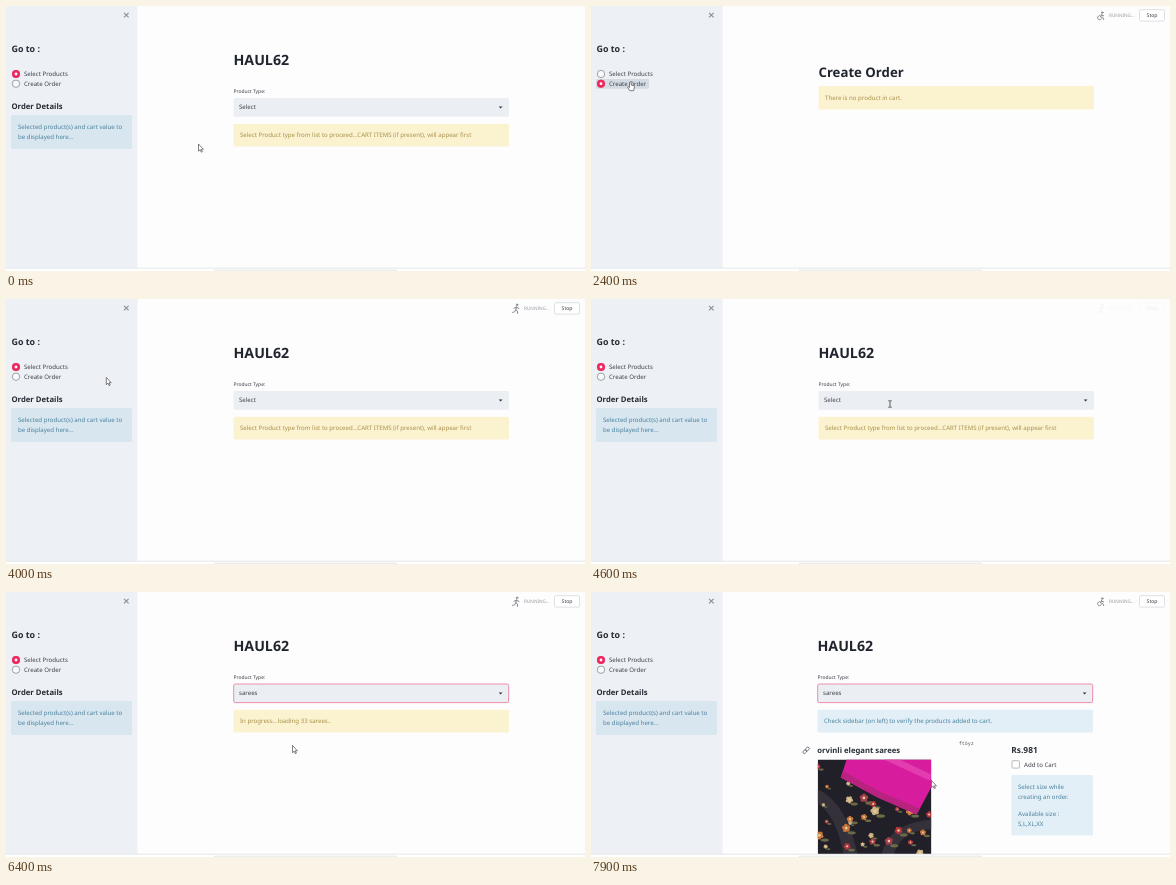
These frames come from a looping animation (579 by 265 pixels, 8 s). An HTML page:

```html
<!DOCTYPE html>
<html lang="en">
<head>
<meta charset="utf-8">
<title>Shop order page</title>
<style>
  html, body { margin: 0; width: 100%; height: 100%; overflow: hidden; background: #fdfdfe; }
  svg { display: block; width: 579px; height: 265px; }
  text { font: 6.1px "Noto Sans", "Open Sans", sans-serif; fill: #3c3f48; text-rendering: geometricPrecision; white-space: pre; }
  .h1 { font-size: 14.2px; font-weight: 700; fill: #20242e; }
  .order { font-size: 13.2px; }
  .h2 { font-size: 8.9px; font-weight: 700; fill: #262a34; }
  .details { font-size: 7.7px; }
  .h3 { font-size: 7.7px; font-weight: 600; fill: #2c303a; }
  .price { font-size: 8.4px; }
  .label { font-size: 4.95px; }
  .mono { font: 5px "Noto Sans Mono", "DejaVu Sans Mono", monospace; fill: #555; }
  .small { font-size: 4.7px; fill: #989ba1; }
  .stop { font-size: 5.1px; }
  .warn rect { fill: #fbf2d0; }
  .warn text { fill: #a8904a; }
  .info rect { fill: #e2eff7; }
  .info text { fill: #4a819c; }
  .side rect { fill: #d8e6f0; }
  .ring { fill: #f8f9fb; stroke: #7a7d84; stroke-width: .7; }
  .dot { fill: #f2265f; }
  .pip { fill: #fff; }
  .line { fill: none; stroke: #84878d; stroke-width: 1; stroke-linecap: round; stroke-linejoin: round; }
  .pointer { fill: #fff; stroke: #4a4a4e; stroke-width: .7; stroke-linejoin: round; }
</style>
</head>
<body>
<svg viewBox="0 0 579 265">
  <rect width="579" height="265" fill="#fdfdfe"/>
  <rect width="131.5" height="262" fill="#edf1f5"/>

  <!-- sidebar -->
  <path d="M118 6.8l4.6 4.6M122.6 6.8l-4.6 4.6" stroke="#8d9199" stroke-width="1.2"/>
  <text class="h2" x="5.5" y="45.6">Go to :</text>
  <rect data-on="2000-3700" x="5" y="73" width="53" height="9.8" rx="1" fill="#d3dce3"/>
  <circle class="ring" cx="10" cy="68" r="3.7"/>
  <circle class="ring" cx="10" cy="77.7" r="3.7"/>
  <g id="choice">
    <circle class="dot" cx="10" cy="68" r="4"/>
    <circle class="pip" cx="10" cy="68" r="1.4"/>
  </g>
  <text x="18" y="70.4">Select Products</text>
  <text x="18" y="80.1">Create Order</text>
  <g data-on="0-2300 4000-8000">
    <text class="h2 details" x="5.5" y="102.7">Order Details</text>
    <g class="info side" id="summary">
      <rect x="5" y="109" width="121" height="34" rx="1.5"/>
      <text x="12" y="123.3">Selected product(s) and cart value to</text>
      <text x="12" y="133.4">be displayed here...</text>
    </g>
  </g>

  <!-- product page -->
  <g id="shop" data-on="0-2300 4000-8000">
    <text class="h1" x="227.5" y="59.2">HAUL62</text>
    <text class="label" x="227.5" y="86.9">Product Type:</text>
    <rect x="227.5" y="92" width="275.5" height="18.8" rx="1.5" fill="#ebeff3"/>
    <rect data-on="4700-8000" x="227.7" y="92" width="275" height="18.6" rx="1.5" fill="none" stroke="#f0648f" stroke-width=".7"/>
    <path d="M492.7 100.6h3.8l-1.9 2z" fill="#33363e"/>
    <text data-on="0-5300" x="233" y="103.4">Select</text>
    <text data-on="5300-8000" x="233" y="103.4">sarees</text>

    <g class="warn" data-on="0-5400">
      <rect x="227.5" y="117.8" width="275.5" height="22.6" rx="1.5"/>
      <text x="234" y="131.4">Select Product type from list to proceed...CART ITEMS (if present), will appear first</text>
    </g>
    <g class="warn" id="progress" data-on="5400-6500">
      <rect x="227.5" y="117.8" width="275.5" height="22.6" rx="1.5"/>
      <text x="234" y="131.4">In progress...loading 33 sarees..</text>
    </g>

    <g data-on="4700-5300">
      <rect x="227.5" y="112.5" width="275.5" height="88" rx="1.5" fill="#fff" stroke="#e1e4e9" stroke-width=".6"/>
      <rect x="227.8" y="148.5" width="275" height="16.4" fill="#ebeff3"/>
      <g id="options"></g>
    </g>

    <g data-on="6500-8000">
      <g class="info">
        <rect x="227.5" y="117.8" width="275.5" height="22.6" rx="1.5"/>
        <text x="234" y="131.4">Check sidebar (on left) to verify the products added to cart.</text>
      </g>
      <g fill="none" stroke="#6d7078" stroke-width=".9" transform="rotate(-45 216 158.4)">
        <rect x="212.2" y="157" width="4.4" height="2.8" rx="1.4"/>
        <rect x="215.6" y="157" width="4.4" height="2.8" rx="1.4"/>
      </g>
      <text class="h3" x="227.3" y="161">orvinli elegant sarees</text>
      <text class="mono" x="368.8" y="153.4">ftöyz</text>
      <text class="h3 price" x="421.3" y="161">Rs.981</text>
      <g class="info" data-on="6600-7500">
        <rect x="227.5" y="167.5" width="134.5" height="23.2" rx="1.5"/>
        <text x="234" y="181.5">Loading...</text>
        <rect x="421.3" y="167.5" width="81.7" height="23.2" rx="1.5"/>
        <text x="428" y="181.5">Loading...</text>
      </g>
      <g data-on="7500-8000">
        <svg x="227.7" y="167.5" width="113.5" height="94.5" viewBox="0 0 113.5 94.5">
          <rect width="114" height="95" fill="#211f27"/>
          <path d="M0 30Q28 42 40 95H26Q18 55 0 44zM64 95Q70 64 114 60V70Q84 70 76 95z" fill="#34313b"/>
          <g id="flowers"></g>
          <path d="M29 0H113.5V28L99 55L60 38L23 18Z" fill="#d81c9e"/>
          <path d="M23 18L60 38L99 55L102 49L62 32L26 12Z" fill="#b8237f"/>
          <path d="M66 0L112 21L113.5 15L82 0Z" fill="#e23cae"/>
        </svg>
        <rect x="422" y="168.7" width="7.4" height="7.4" rx="1" fill="#fff" stroke="#a5a9b0" stroke-width=".8"/>
        <text x="434" y="174.8">Add to Cart</text>
      </g>
      <g class="info" id="sizes" data-on="6600-8000">
        <rect x="421.3" y="197" width="81.7" height="60.4" rx="1.5"/>
        <text x="428" y="211.4">Select size while</text>
        <text x="428" y="221.4">creating an order.</text>
        <text x="428" y="238">Available size :</text>
        <text x="428" y="248">S,L,XL,XX</text>
      </g>
    </g>
  </g>

  <!-- order page -->
  <g data-on="2300-4000">
    <text class="h1 order" x="227.5" y="71.3">Create Order</text>
    <g class="warn">
      <rect x="227.5" y="80" width="275.5" height="23.4" rx="1.5"/>
      <text x="234" y="93.8">There is no product in cart.</text>
    </g>
  </g>

  <!-- run status -->
  <g id="status">
    <g id="poseA" class="line">
      <circle cx="511.2" cy="6.6" r=".8"/>
      <path d="M510.6 8.4l-1.3 2.4 2.4 .6 1 2.2M510.4 9l2.2 .8M508.4 9.6a2.1 2.1 0 1 0 2 3.3"/>
    </g>
    <g id="poseB" class="line">
      <circle cx="511" cy="5.8" r=".8"/>
      <path d="M510.6 7.8l-.8 3 1.6 1.2 .2 2.4M509.8 10.8l-1.2 2-2 .6M510.4 8.2l-2.4 1M510.6 8.4l2.4 1"/>
    </g>
    <text class="small" x="518" y="11.4">RUNNING...</text>
    <rect x="548.5" y="3.7" width="25" height="11.4" rx="1.5" fill="#fff" stroke="#d7d9de" stroke-width=".8"/>
    <text class="stop" x="555.6" y="11.2">Stop</text>
  </g>

  <!-- page bottom -->
  <rect y="262" width="579" height="3" fill="#fff"/>
  <path d="M0 262.2H579" stroke="#dfe0e3" stroke-width=".8"/>
  <path d="M208.5 265V264.2H390.5V265" fill="none" stroke="#d9dadc" stroke-width=".7"/>

  <g id="cursor">
    <path id="arrow" class="pointer" d="M0 0V7.2L1.7 5.7L2.8 8.2L3.9 7.7L2.8 5.3H4.9Z"/>
    <path id="hand" class="pointer" d="M-.8 .6Q0 -.6 .8 .6V3.3L3.6 4Q4.3 4.3 4.1 5.4L3.2 9H-.6L-2.8 5.6Q-2.6 4.6 -1.6 5.2L-.8 5.8Z"/>
    <path id="beam" d="M-1.7 -3.2H-.5L0 -2.8L.5 -3.2H1.7M0 -2.8V2.8M-1.7 3.2H-.5L0 2.8L.5 3.2H1.7" fill="none" stroke="#333" stroke-width=".8"/>
  </g>
</svg>
<script>
  const LOOP = 8000;
  const $ = id => document.getElementById(id);
  const NS = "http://www.w3.org/2000/svg";

  function add(parent, tag, attrs, text = "") {
    const el = document.createElementNS(NS, tag);
    for (const key in attrs) el.setAttribute(key, attrs[key]);
    el.textContent = text;
    parent.append(el);
  }

  ["Select", "kurtis", "sarees", "tops", "gowns"].forEach((name, i) =>
    add($("options"), "text", { x: 233, y: 126.2 + i * 16.4 }, name));

  // Blossoms with leaves, one in each cell of a loose grid
  let seed = 11;
  const rand = () => (seed = seed * 16807 % 2147483647) / 2147483647;
  const shades = ["#b8343c", "#c9763a", "#cdb585", "#a33d4c"];
  for (let i = 0; i < 42; i++) {
    const x = (i % 7 + rand()) * 16.2, y = (Math.floor(i / 7) + rand()) * 15.8;
    const r = 1.5 + rand() * 2.2;
    const fill = shades[Math.floor(rand() * shades.length)];
    add($("flowers"), "ellipse", { cx: x + r * 1.6, cy: y + r * 1.4, rx: r * 1.2, ry: r * .5, fill: "#6b6a48" });
    for (let a = 0; a < 5; a++) {
      const angle = a * Math.PI * .4 + x;
      add($("flowers"), "circle", { cx: x + r * .7 * Math.cos(angle), cy: y + r * .7 * Math.sin(angle), r: r * .55, fill });
    }
    add($("flowers"), "circle", { cx: x, cy: y, r: r * .4, fill: "#e2cd9c" });
  }

  const timed = [...document.querySelectorAll("[data-on]")].map(el => ({
    el, spans: el.dataset.on.split(" ").map(s => s.split("-").map(Number))
  }));

  // Rows of time and values, joined by straight runs
  function track(rows, t) {
    const next = rows.findIndex(row => row[0] > t);
    if (next < 0) return rows[rows.length - 1].slice(1);
    if (next === 0) return rows[0].slice(1);
    const a = rows[next - 1], b = rows[next];
    const k = (t - a[0]) / (b[0] - a[0]);
    return a.slice(1).map((v, i) => v + (b[i + 1] - v) * k);
  }

  const path = [
    [0, 192.5, 138], [800, 190, 138], [1000, 178, 142], [1150, 145, 146],
    [1400, 75, 112], [1600, 42, 80], [1700, 40.5, 78.5], [2000, 39.5, 76],
    [3300, 39, 75], [3550, 40, 67], [3800, 40, 67], [4100, 130, 84],
    [4500, 299, 105], [4800, 299, 105], [5100, 289, 142], [5250, 286.5, 153.5],
    [7250, 286.5, 153.5], [7500, 318, 172], [7800, 340.5, 188.5]
  ];
  const shapes = [
    [0, "arrow"], [1500, "hand"], [3900, "arrow"], [4300, "beam"], [4850, "hand"],
    [5300, "arrow"], [6600, "beam"], [7350, "arrow"]
  ];
  const running = [
    [2000, 0], [2100, 1], [2500, 1], [2700, 0], [3750, 0], [3900, 1],
    [4300, 1], [4600, .08], [4700, 0], [5300, 0], [5400, 1]
  ];
  const progress = [[5400, .2], [5600, .45], [6000, 1]];
  const stale = [[6600, 1], [7000, .35], [7300, .35], [7500, 1]];

  const show = (el, on) => { el.style.display = on ? "" : "none"; };

  function draw(t) {
    for (const { el, spans } of timed) show(el, spans.some(([a, b]) => t >= a && t < b));

    const ordering = t >= 2000 && t < 3700;
    $("choice").setAttribute("transform", `translate(0 ${ordering ? 9.7 : 0})`);
    $("shop").setAttribute("transform", `translate(${t >= 6500 ? -1 : 0} 0)`);
    $("sizes").setAttribute("transform", `translate(0 ${t >= 7500 ? -14 : 0})`);

    $("status").style.opacity = track(running, t)[0];
    $("progress").style.opacity = track(progress, t)[0];
    $("summary").style.opacity = track(stale, t)[0];
    const second = Math.floor(t / 300) % 2 === 1;
    show($("poseA"), !second);
    show($("poseB"), second);

    $("cursor").setAttribute("transform", `translate(${track(path, t).join(" ")})`);
    const shape = shapes.filter(row => row[0] <= t).pop()[1];
    for (const id of ["arrow", "hand", "beam"]) show($(id), id === shape);
  }

  const start = performance.now();
  function tick() {
    draw((performance.now() - start) % LOOP);
    requestAnimationFrame(tick);
  }
  tick();
</script>
</body>
</html>
```
